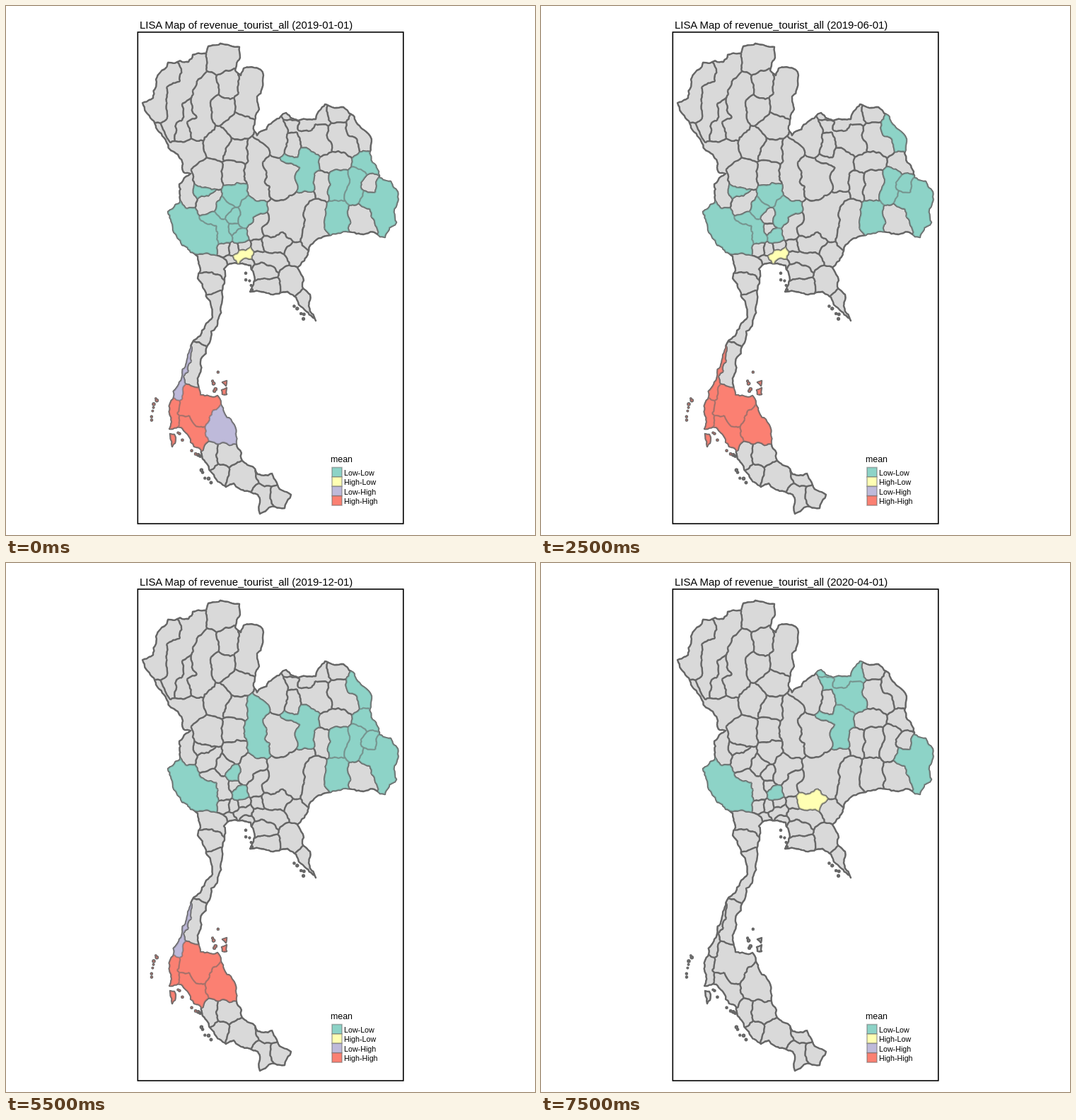
Write an HTML page that moves like this. It is 748 px wide and 748 px high and loops after 8 s.

```html
<!DOCTYPE html>
<html lang="en">
<head>
<meta charset="utf-8">
<title>LISA map</title>
<style>
html, body { margin: 0; width: 100%; height: 100%; overflow: hidden; background: #fff; }
svg { display: block; width: 748px; height: 748px; font-family: "Liberation Sans", Arial, sans-serif; }
#lines { fill: none; stroke: #666; stroke-width: 2.3; stroke-linejoin: round; }
#legend rect { stroke: #666; stroke-opacity: .5; stroke-width: 1.6; }
</style>
</head>
<body>
<svg viewBox="0 0 748 748">
  <defs><clipPath id="land"><path id="coast"/></clipPath></defs>
  <text id="title" x="189" y="32" font-size="14.9"></text>
  <rect x="186.3" y="37" width="375.5" height="695" fill="none" stroke="#000" stroke-width="1.6"/>
  <use href="#coast" fill="#d9d9d9"/>
  <g id="lines"><use href="#coast"/><path id="borders" clip-path="url(#land)"/></g>
  <g id="areas" clip-path="url(#land)"></g>
  <use href="#lines" opacity=".5"/>
  <text x="459" y="645" font-size="12.4">mean</text>
  <g id="legend" font-size="10.7"></g>
</svg>
<script>
const colors = ['#8DD3C7', '#FFFFB3', '#BEBADA', '#FB8072'];
const labels = ['Low-Low', 'High-Low', 'Low-High', 'High-High'];

// Key points of the coast and frontier, clockwise from the western tip
const mainland = [
  '193,137 208,130 212,104 229,80 258,79 264,69 283,67 286,57 303,53 330,58 331,73 324,91 332,98 336,88 360,90 364,98 355,128 358,146 350,170 355,183 377,164 396,151',
  '413,162 438,160 451,139 477,143 497,167 515,184 514,208 528,243 544,248 554,263 549,287 552,306 536,327 524,322 473,321 436,333',
  '422,360 412,370 421,388 419,397 430,408 428,424 438,445 417,425 398,404 381,407 345,404 350,394 346,367 320,364 308,372 309,392 304,424 290,460 285,480 275,503 271,533',
  '275,550 299,551 308,574 321,590 326,620 334,643 356,662 376,661 385,680 403,691 394,710 372,709 359,718 356,691 322,675 311,680 292,661 276,628 266,623 248,596',
  '231,598 232,562 245,532 257,497 260,486 277,459 292,440 283,406 271,385 275,374 271,354 249,338 236,314 229,291 246,278 245,252 261,237 251,235 243,210 212,172 198,150'
].join(' ');
const islands = ['232,605 238,606 239,618 235,623', '305,543 312,540 312,549 306,549', '306,532 312,530 311,537'];
const chains = ['410,424 425,448', '243,602 252,616', '262,628 281,641', '276,656 294,679', '294,531 296,551', '204,586 214,547', '338,380 352,404', '302,517 303,518'];

// Each province is the land nearest to its own points
const provinces = {
  maeHongSon: '230,97 212,125 215,150',
  chiangMai: '264,78 262,97 242,125 240,150 232,175',
  lamphun: '258,150 249,177',
  lampang: '286,115 276,145 268,172',
  chiangRai: '302,78',
  phayao: '313,112',
  nan: '345,112 340,140',
  phrae: '306,142',
  uttaradit: '330,168',
  sukhothai: '300,197',
  phitsanulok: '328,206',
  tak: '218,182 245,207 262,204 248,255 255,274',
  kamphaengPhet: '288,238 285,250',
  phichit: '323,238',
  nakhonSawan: '282,262 325,268',
  uthaiThani: '286,270 284,283',
  chaiNat: '308,288',
  suphan: '290,303 308,314 308,327',
  kanchanaburi: '242,287 256,298 268,316 287,312 292,328 287,342',
  singBuri: '323,301',
  angThong: '323,314',
  ayutthaya: '331,325',
  lopBuri: '345,285 358,288 335,302',
  saraburi: '352,320 363,301',
  nakhonNayok: '356,341',
  prachin: '372,337 389,337',
  pathumThani: '336,342',
  nonthaburi: '322,345',
  nakhonPathom: '310,344',
  bangkok: '329,355 336,350 342,350',
  samutPrakan: '340,363',
  samutSakhon: '318,361',
  ratchaburi: '287,363 302,367',
  phetchaburi: '290,390',
  prachuap: '294,416 292,450 284,462',
  chachoengsao: '356,354 370,358 383,362',
  saKaeo: '408,350',
  chonBuri: '362,372 370,376',
  rayong: '372,394',
  chanthaburi: '400,385 404,395',
  trat: '426,412',
  phetchabun: '357,206 356,235 360,265',
  loei: '386,172 386,190 386,200 372,186',
  nongBua: '407,192 405,206',
  udon: '404,166 425,183 442,178 425,190 430,196 446,199',
  nongKhai: '405,158 425,169 445,158',
  buengKan: '466,150',
  sakon: '468,180 474,196 488,198',
  nakhonPhanom: '498,176 508,194',
  mukdahan: '506,220 515,226',
  kalasin: '472,218 456,222',
  mahaSarakham: '447,248 446,262',
  roiEt: '470,245 468,262',
  yasothon: '498,244 495,266',
  amnat: '513,252',
  ubon: '510,272 530,287 537,305 536,258',
  sisaket: '500,292 506,312',
  surin: '468,289 468,305',
  buriram: '438,286 434,303 432,322',
  korat: '380,288 378,300 374,314 396,284 412,276 425,268 408,303 408,316',
  chaiyaphum: '380,240 378,226 398,228 396,240 400,254 388,262',
  khonKaen: '402,217 424,212 432,222 422,245 424,258',
  chumphon: '271,495 268,513 262,527',
  ranong: '253,495 248,512 243,533 242,544',
  surat: '258,545 256,568 270,582 280,565 290,558 308,536',
  phangnga: '232,563 234,590',
  phuket: '235,614',
  krabi: '256,590 254,598 266,602 268,618',
  nakhonSi: '305,578 298,600 312,600',
  trang: '287,634',
  phatthalung: '313,634',
  satun: '302,666',
  songkhla: '328,667 346,674',
  pattani: '367,668',
  yala: '363,685 364,700',
  narathiwat: '386,690'
};

// Class lists in legend order, parted by slashes
const core = 'nakhonSawan kanchanaburi suphan chaiNat lopBuri';
const inner = 'singBuri ayutthaya';
const isan = 'khonKaen mukdahan roiEt yasothon ubon surin';
const red = 'surat phangnga phuket krabi';
const spring = `${core} nakhonPhanom yasothon amnat ubon surin`;
const states = [
  `${core} ${inner} angThong ${isan}/bangkok/ranong nakhonSi/${red}`,
  `${spring}///${red} ranong nakhonSi`,
  `${spring} ayutthaya/bangkok//${red} ranong nakhonSi`,
  `${core} ${inner} angThong saraburi ${isan} amnat sisaket nakhonPhanom/bangkok//${red} ranong nakhonSi`,
  `kanchanaburi ${inner} ${isan} amnat sisaket nakhonPhanom nongKhai//ranong/${red} nakhonSi`,
  `kanchanaburi ${inner} ${isan} amnat nakhonPhanom phetchabun//ranong/${red} nakhonSi`,
  `${core} ${inner} ${isan} amnat/bangkok/ranong phatthalung/${red} nakhonSi`,
  'kanchanaburi ayutthaya khonKaen nongKhai udon ubon/prachin//'
];
const months = [0, 0, 0, 1, 1, 2, 3, 3, 3, 4, 4, 5, 0, 0, 6, 7];

const $ = id => document.getElementById(id);
const points = s => s.split(' ').map(p => p.split(',').map(Number));
const random = n => Math.abs(Math.sin(n * 127.1) * 43758.5) % 1;

// Breaks an edge into a jagged line, the same one in both directions
function jag(a, b) {
  const len = Math.hypot(b[0] - a[0], b[1] - a[1]);
  if (len < 5) return 'L' + b[0].toFixed(1) + ',' + b[1].toFixed(1);
  const h = a[0] + b[0] + 3 * (a[1] + b[1]);
  const amp = Math.min(len * .12, 3);
  const mid = [
    (a[0] + b[0]) / 2 + amp * Math.sin(h * 12.9),
    (a[1] + b[1]) / 2 + amp * Math.cos(h * 7.7)
  ];
  return jag(a, mid) + jag(mid, b);
}
const ring = pts => 'M' + pts[0].slice(0, 2) + pts.map((p, i) => jag(p, pts[(i + 1) % pts.length])).join('') + 'Z';

function islets(chain) {
  const [a, b] = points(chain);
  const n = Math.ceil(Math.hypot(b[0] - a[0], b[1] - a[1]) / 6);
  let d = '';
  for (let i = 0; i < n; i++) {
    const seed = a[0] + i * 7, f = i / n, r = .7 + random(seed);
    const x = a[0] + (b[0] - a[0]) * f + random(seed + 1) * 5 - 2.5;
    const y = a[1] + (b[1] - a[1]) * f + random(seed + 2) * 5 - 2.5;
    d += `M${x - r},${y}a${r},${r} 0 1 1 ${2 * r},0a${r},${r} 0 1 1 ${-2 * r},0Z`;
  }
  return d;
}

const sites = Object.entries(provinces).flatMap(([name, s]) => points(s).map(([x, y]) => ({ x, y, name })));

// Voronoi cell as [x, y, site beyond the edge that starts here]
function cell(s) {
  let poly = [[150, 0], [600, 0], [600, 748], [150, 748]];
  for (const t of sites) {
    if (t === s) continue;
    const dx = t.x - s.x, dy = t.y - s.y;
    const side = p => (p[0] - (s.x + t.x) / 2) * dx + (p[1] - (s.y + t.y) / 2) * dy;
    const cut = [];
    poly.forEach((p, i) => {
      const q = poly[(i + 1) % poly.length], u = side(p), v = side(q), f = u / (u - v);
      if (u <= 0) cut.push(p);
      if (u <= 0 !== v <= 0) {
        cut.push([p[0] + (q[0] - p[0]) * f, p[1] + (q[1] - p[1]) * f, u <= 0 ? t : p[2]]);
      }
    });
    poly = cut;
  }
  return poly;
}

const shape = {};
let borders = '';
for (const s of sites) {
  const poly = cell(s);
  shape[s.name] = (shape[s.name] || '') + ring(poly);
  poly.forEach((p, i) => {
    if (p[2] && p[2].name > s.name) borders += `M${p[0]},${p[1]}` + jag(p, poly[(i + 1) % poly.length]);
  });
}
$('borders').setAttribute('d', borders);
$('coast').setAttribute('d', [mainland, ...islands].map(s => ring(points(s))).join('') + chains.map(islets).join(''));

$('legend').innerHTML = labels.map((t, i) => {
  const y = 652.5 + i * 13.4;
  return `<rect x="461" y="${y}" width="14" height="13.4" fill="${colors[i]}"/><text x="478" y="${y + 11.3}">${t}</text>`;
}).join('');

let shown = -1;
function draw(now) {
  const m = Math.floor(now % 8000 / 500);
  if (m === shown) return;
  shown = m;
  const month = String(m % 12 + 1).padStart(2, '0');
  $('title').textContent = `LISA Map of revenue_tourist_all (${2019 + Math.floor(m / 12)}-${month}-01)`;
  $('areas').innerHTML = states[months[m]].split('/').map((list, i) =>
    list.split(' ').filter(Boolean).map(k => `<path d="${shape[k]}" fill="${colors[i]}"/>`).join('')
  ).join('');
}
const start = performance.now();
function tick() {
  draw(performance.now() - start);
  requestAnimationFrame(tick);
}
tick();
</script>
</body>
</html>
```
